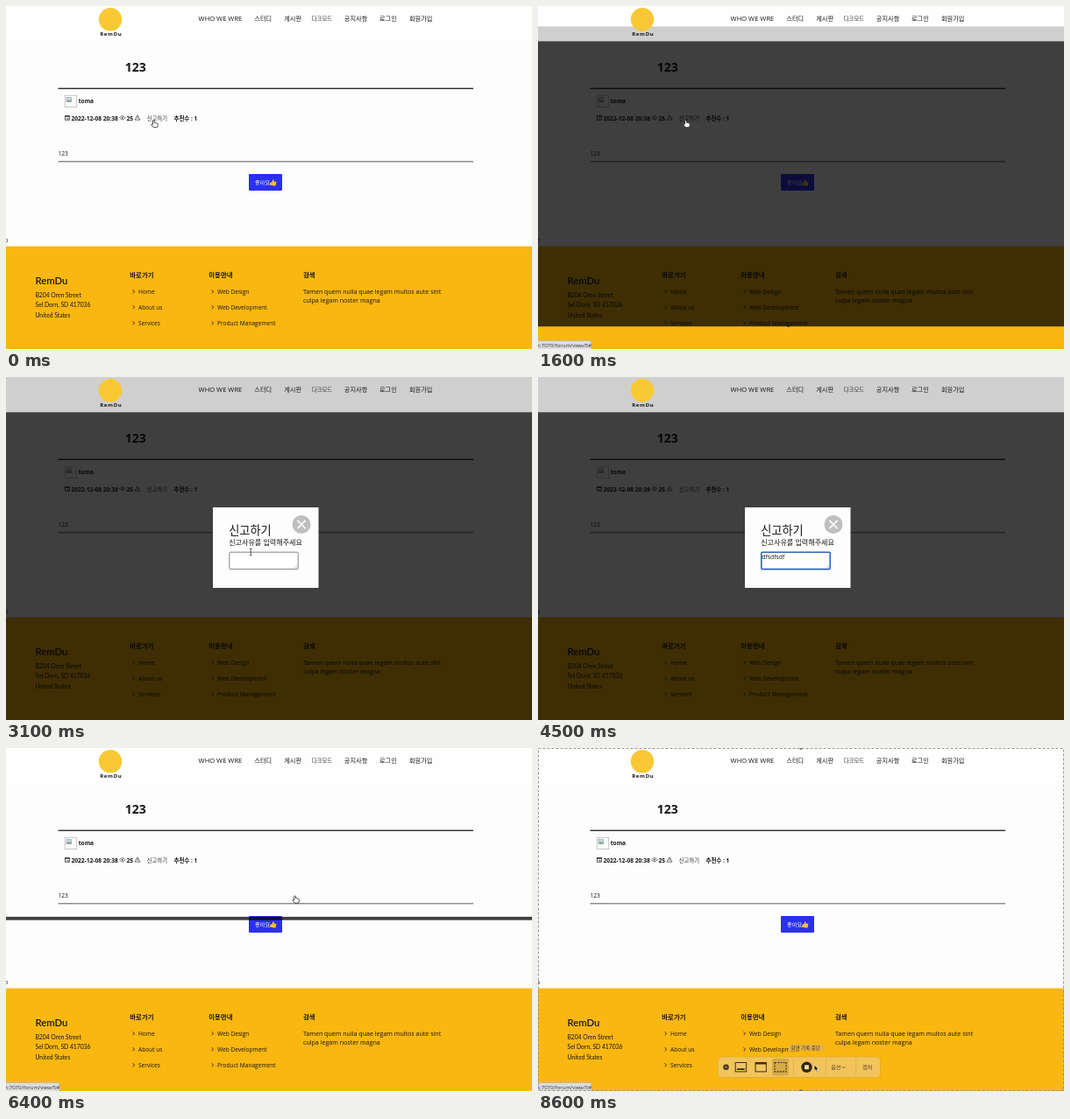
Animation of 600x392 px, one loop 8.7 s. Source, as an HTML page with a canvas:

```html
<!DOCTYPE html>
<html lang="ko">
<head>
<meta charset="utf-8">
<title>Report dialog</title>
<style>
html, body { margin: 0; width: 100%; height: 100%; overflow: hidden; background: #fdfdfd; }
canvas { display: block; width: 100vw; height: 100vh; }
</style>
</head>
<body>
<canvas id="stage"></canvas>
<script>
const W = 600, H = 392, LOOP = 8700, STEP = 100;
const OPEN_AT = 891, CLOSE_AT = 5975, HALF = 500;
const CX = 296.25, CY = 194.8;
const SANS = '"Open Sans", "Noto Sans CJK KR", "Noto Sans CJK", sans-serif';
const LATO = 'Lato, sans-serif';
const INK = '#161616';

const canvas = document.getElementById('stage');
const ctx = canvas.getContext('2d');
const dpr = window.devicePixelRatio || 1;
canvas.width = W * dpr;
canvas.height = H * dpr;

const clamp = v => Math.min(1, Math.max(0, v));
const mix = (a, b, p) => a + (b - a) * p;

// cubic-bezier(.165, .84, .44, 1)
function ease(x) {
  if (x <= 0) return 0;
  if (x >= 1) return 1;
  const at = (a, b, s) => 3 * a * s * (1 - s) ** 2 + 3 * b * s * s * (1 - s) + s ** 3;
  let lo = 0, hi = 1;
  for (let i = 0; i < 24; i++) {
    const mid = (lo + hi) / 2;
    if (at(.165, .44, mid) < x) lo = mid; else hi = mid;
  }
  return at(.84, 1, lo);
}

function text(str, x, y, size, o = {}) {
  ctx.font = `${o.weight || 400} ${size}px ${o.font || SANS}`;
  ctx.letterSpacing = (o.gap || 0) + 'px';
  ctx.fillStyle = o.color || INK;
  ctx.fillText(str, x, y);
}

function rect(x, y, w, h, color) {
  ctx.fillStyle = color;
  ctx.fillRect(x, y, w, h);
}

function round(x, y, w, h, r, color) {
  ctx.beginPath();
  ctx.roundRect(x, y, w, h, r);
  ctx.fillStyle = color;
  ctx.fill();
}

function disc(x, y, r, color) {
  ctx.beginPath();
  ctx.arc(x, y, r, 0, 7);
  ctx.fillStyle = color;
  ctx.fill();
}

function box(x, y, w, h, color, lw = 1) {
  ctx.strokeStyle = color;
  ctx.lineWidth = lw;
  ctx.strokeRect(x, y, w, h);
}

function line(points, color, lw) {
  ctx.beginPath();
  points.forEach(([x, y], i) => i ? ctx.lineTo(x, y) : ctx.moveTo(x, y));
  ctx.strokeStyle = color;
  ctx.lineWidth = lw;
  ctx.stroke();
}

function cross(x, y, r, color, lw) {
  line([[x - r, y - r], [x + r, y + r]], color, lw);
  line([[x + r, y - r], [x - r, y + r]], color, lw);
}

function shape(d, x, y, fill, stroke, lw) {
  ctx.save();
  ctx.translate(x, y);
  const path = new Path2D(d);
  ctx.lineJoin = 'round';
  if (fill) { ctx.fillStyle = fill; ctx.fill(path); }
  if (stroke) { ctx.strokeStyle = stroke; ctx.lineWidth = lw; ctx.stroke(path); }
  ctx.restore();
}

function drawPost() {
  rect(0, 0, W, H, '#fdfdfd');
  text('123', 135.8, 74.5, 14, { weight: 700 });
  rect(59.5, 93.6, 473.5, 1.4, '#2c2c2c');

  box(67.2, 102.3, 13.5, 13.2, '#b9b9b9', .8);
  rect(69, 104.5, 5.5, 5, '#c3d5ee');
  shape('M0 5 L2 2.6 L3.5 4 L5.5 2.4 V5 Z', 69, 104.5, '#6ba46c');
  box(69, 104.5, 5.5, 5, '#9a9a9a', .6);
  text('toma', 82.7, 110.6, 6.6, { weight: 700 });

  box(67.5, 125.6, 4.8, 4.6, '#333', .8);
  rect(67.3, 125.2, 5.2, 1.5, '#333');
  rect(69.8, 128.1, 1.5, 1.4, '#333');
  text('2022-12-08 20:38', 74.4, 130.6, 6.65, { weight: 700 });
  shape('M0 0 Q3.2 -4.4 6.4 0 Q3.2 4.4 0 0 Z', 129.6, 127.8, null, '#333', .7);
  disc(132.8, 127.8, 1, '#444');
  text('25', 137.4, 130.6, 6.65, { weight: 700 });
  shape('M3 0 L6 5.3 H0 Z', 147, 124.8, null, '#333', .7);
  rect(149.7, 126.8, .7, 1.7, '#333');
  text('신고하기', 160.8, 130.8, 6.3, { color: '#333' });
  text('추천수 : 1', 191.4, 130.6, 6.5, { weight: 700 });

  text('123', 59.4, 171, 6.7);
  rect(59.5, 177.4, 473.5, .9, '#484848');
  round(277, 192, 38, 19, 1.2, '#2b30ee');
  text('좋아요', 284, 204.2, 6.2, { color: '#fff' });
  shape('M0 3 L2.2 2.4 L3.6 -.8 Q5 -1 4.6 1.8 H7 Q7.6 2.2 7.2 3.4 L6.6 6 Q6.2 6.8 4.8 6.6 L0 5.6 Z', 301, 199, '#f9bf2c');
  text('o', -1.8, 270, 6.7);
}

function links(x, items) {
  items.forEach((label, i) => {
    const y = 328.6 + 18 * i;
    line([[x - 6.4, y - 4.3], [x - 4.4, y - 2.3], [x - 6.4, y - .3]], '#222', .9);
    text(label, x, y, 6.6);
  });
}

function drawFooter() {
  rect(0, 274.6, W, H, '#fab70f');
  text('RemDu', 33.4, 318, 11.3, { font: LATO, weight: 600 });
  ['B204 Oren Street', 'Sel Dorn, SD 417036', 'United States'].forEach((s, i) =>
    text(s, 33.5, 332.9 + 11.3 * i, 6.75, { font: LATO }));
  [['바로가기', 141.3], ['이용안내', 231.3], ['검색', 339]].forEach(([s, x]) =>
    text(s, x, 309.6, 7.4, { weight: 700 }));
  links(151, ['Home', 'About us', 'Services']);
  links(241, ['Web Design', 'Web Development', 'Product Management']);
  text('Tamen quem nulla quae legam multos aute sint', 339, 329, 7.1);
  text('culpa legam noster magna', 339, 339.2, 7.1);
}

function drawHeader() {
  rect(0, 0, W, 40.3, 'rgba(255,255,255,.75)');
  disc(119, 15.3, 13.2, '#f8c934');
  text('RemDu', 107.2, 34, 6, { weight: 700, gap: .7 });
  text('WHO WE WRE', 219.6, 17.1, 7.6);
  [['스터디', 283.3], ['게시판', 317.2], ['공지사항', 385.8], ['로그인', 426], ['회원가입', 460]]
    .forEach(([s, x]) => text(s, x, 17.1, 7.2));
  text('다크모드', 348.8, 17, 6.3, { color: '#333' });
}

function overlayScale(t) {
  const thin = .005;
  if (t < CLOSE_AT) {
    return [ease((t - OPEN_AT) / HALF), mix(thin, 1, ease((t - OPEN_AT - HALF) / HALF))];
  }
  return [1 - ease((t - CLOSE_AT - HALF) / HALF), mix(1, thin, ease((t - CLOSE_AT) / HALF))];
}

function modalScale(t) {
  return t < CLOSE_AT ? ease((t - OPEN_AT - 800) / HALF) : 1 - ease((t - CLOSE_AT) / HALF);
}

function typed(t) {
  const keys = [3400, 3450, 3500, 3600, 3650, 3700, 3800, 4500];
  return 'dfsdfsdf'.slice(0, keys.filter(k => t >= k).length);
}

// Coordinates are those of the fully open dialog.
function drawDialog(t) {
  rect(236, 149, 120.5, 92, '#fdfdfd');
  text('신고하기', 254.2, 179.5, 13.2, { weight: 500 });
  text('신고사유를 입력해주세요', 254.2, 192, 8.07);
  const focused = t >= 3200 && t < 5800;
  ctx.beginPath();
  ctx.roundRect(254.8, 200.2, 78.4, 19.4, 1);
  ctx.fillStyle = '#fff';
  ctx.fill();
  ctx.strokeStyle = focused ? '#2a66bd' : '#777';
  ctx.lineWidth = focused ? 1.6 : .9;
  ctx.stroke();
  line([[329, 218.5], [332.3, 215.2]], '#888', .5);
  line([[330.8, 218.5], [332.3, 217]], '#888', .5);
  text(typed(t), 255.2, 208, 6.85);
  disc(337, 168.5, 10.5, t >= 5600 ? '#5c5c5c' : '#bfbfbf');
  cross(337, 168.5, 4.6, '#fff', 1.5);
}

function drawOverlay(t) {
  if (t < OPEN_AT || t > CLOSE_AT + 2 * HALF) return;
  const [sx, sy] = overlayScale(t);
  const w = 304 * sx, h = 197.5 * sy;
  rect(CX - w, CY - h, 2 * w, 2 * h, 'rgba(0,0,0,.75)');
}

function drawModal(t) {
  const z = modalScale(t);
  if (z < .004) return;
  const [sx, sy] = overlayScale(t);
  ctx.save();
  ctx.translate(CX, CY);
  ctx.scale(z * sx, z * sy);
  ctx.translate(-CX, -CY);
  drawDialog(t);
  ctx.restore();
}

function drawStatus(t) {
  if (t < 100 || (t >= 2900 && t < 5700)) return;
  ctx.beginPath();
  ctx.roundRect(-2, 382.4, 63, 12, 1.5);
  ctx.fillStyle = '#dcdcdc';
  ctx.fill();
  ctx.strokeStyle = '#aaa';
  ctx.lineWidth = .6;
  ctx.stroke();
  text('t:7070/forum/view/5#', 0, 389.8, 6, { color: '#333' });
}

function drawCapture(t) {
  const a = clamp((t - 7300) / 300);
  if (!a) return;
  ctx.save();
  ctx.globalAlpha = a;
  ctx.setLineDash([3, 2]);
  box(.5, .5, W - 1, H - 1, '#8d8d8d', .9);
  ctx.setLineDash([]);
  disc(300, .5, 1.5, '#777');
  disc(300, H - .5, 1.5, '#777');

  round(205, 353, 185.5, 23.6, 4.5, '#f1c45c');
  ctx.strokeStyle = '#d3a23c';
  ctx.lineWidth = .6;
  ctx.stroke();
  const dark = '#3d3116';
  disc(214.5, 364.7, 3.2, dark);
  cross(214.5, 364.7, 1.2, '#f1c45c', .8);
  box(225.2, 359.5, 12.4, 10.4, dark, 1);
  rect(227, 366.2, 8.8, 1.8, dark);
  box(248, 359.5, 12.4, 10.4, dark, 1);
  rect(248, 359.5, 12.4, 2, dark);
  round(267, 355, 19, 19.4, 2.5, '#d6aa48');
  ctx.setLineDash([2, 1.2]);
  box(270, 359.5, 13, 10.4, dark, 1.1);
  ctx.setLineDash([]);
  [291, 328, 362.5].forEach(x => rect(x, 355.5, .6, 18.5, '#d9ab48'));
  disc(306.5, 364.8, 6.2, '#33270f');
  rect(304.1, 362.4, 4.8, 4.8, '#f8e3b0');
  text('옵션', 334.2, 367, 6.1, { color: '#5b4719' });
  line([[346.8, 364], [348.6, 365.8], [350.4, 364]], '#5b4719', .8);
  text('캡처', 370.2, 367, 6.1, { color: '#5b4719' });
  if (t >= 8500) {
    rect(286, 338.4, 40.5, 8, '#e3b24a');
    text('화면 기록 중단', 288.6, 344.5, 5.5, { color: '#4c3a12' });
  }
  ctx.restore();
}

// [time, x, y] of the pointer hot spot
const moves = [
  [0, 168.4, 130.5], [2700, 168.4, 130.5], [3200, 292, 208], [4900, 292, 208],
  [5500, 329.6, 169], [6500, 329.6, 169], [7200, 340, 285], [8200, 330, 340],
  [8500, 315.2, 362.2], [LOOP, 315.2, 362.2]
];

function pointerAt(t) {
  const i = moves.findIndex(m => m[0] > t);
  const [t0, x0, y0] = moves[i - 1], [t1, x1, y1] = moves[i];
  const p = (t - t0) / (t1 - t0), s = p * p * (3 - 2 * p);
  return [mix(x0, x1, s), mix(y0, y1, s)];
}

function drawPointer(t) {
  if (t >= 3400 && t < 5000) return;
  const [x, y] = pointerAt(t);
  if (t < 2800 || (t >= 5500 && t < 6600)) {
    shape('M-.9 .6 Q0 -.5 .9 .6 V2.8 Q1.8 2.2 2.4 3 Q3.4 2.7 3.8 3.5 Q4.9 3.4 4.9 4.6 V5.8 L4 8.2 H-.3 L-2.7 5 Q-2.6 3.8 -.9 4.8 Z', x, y, '#fff', '#222', .8);
  } else if (t >= 3100 && t < 5200) {
    line([[x - 1.5, y - 4], [x, y - 3.4], [x + 1.5, y - 4]], '#222', .7);
    line([[x, y - 3.4], [x, y + 3.4]], '#222', .7);
    line([[x - 1.5, y + 4], [x, y + 3.4], [x + 1.5, y + 4]], '#222', .7);
  } else {
    shape('M0 0 V6.6 L1.5 5.3 L2.5 7.6 L3.6 7.1 L2.7 4.9 H4.7 Z', x, y, '#111', '#fff', .5);
  }
}

function draw(now) {
  const t = Math.floor(now % LOOP / STEP) * STEP;
  ctx.setTransform(dpr, 0, 0, dpr, 0, 0);
  drawPost();
  drawFooter();
  drawOverlay(t);
  drawHeader();
  drawModal(t);
  drawStatus(t);
  drawCapture(t);
  drawPointer(t);
}

const start = performance.now();
function tick() {
  draw(performance.now() - start);
  requestAnimationFrame(tick);
}
tick();
</script>
</body>
</html>
```
